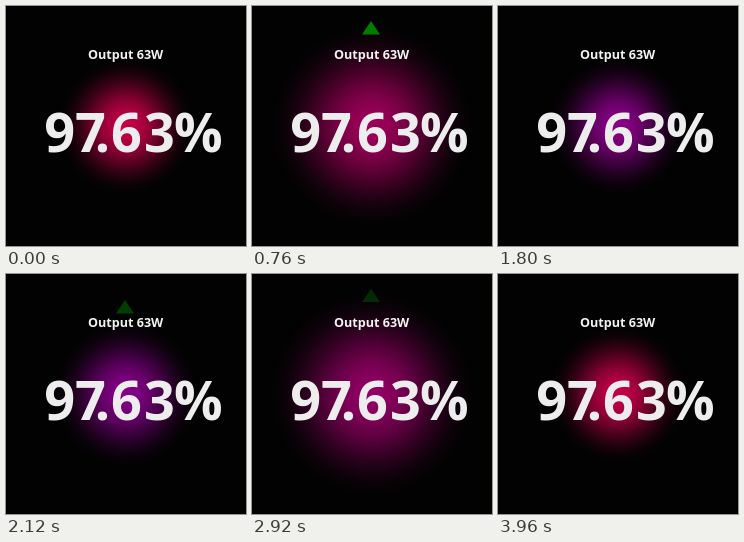
Recreate the animation shown at these times as an HTML page. Size 240 by 240 pixels, loop 4000 ms.

```html
<!DOCTYPE html>
<html lang="en">
<head>
<meta charset="utf-8">
<title>Output</title>
<style>
  html, body { margin: 0; width: 100%; height: 100%; overflow: hidden; background: #020202; }
  svg { display: block; width: 100%; height: 100%; }
  text { font-family: "Open Sans", "Noto Sans", sans-serif; font-weight: 700; }
  .value { font-weight: 650; }
</style>
</head>
<body>
<svg viewBox="0 0 240 240">
  <defs>
    <radialGradient id="fade"></radialGradient>
  </defs>
  <circle id="glow" cx="120" cy="120" fill="url(#fade)"/>
  <path id="arrow" d="M0 0L9 13.6H-9Z" fill="#0f0"/>
  <text x="119.6" y="53" font-size="12.6" text-anchor="middle" fill="#f2f2f2">Output 63W</text>
  <text class="value" x="38.3 69 88.7 105 138 168" y="146" font-size="54" fill="#ededed">97.63%</text>
</svg>
<script>
const LOOP = 4000, PULSE = 2000, STEP = 40;
const PINK = [196, 0, 70], PURPLE = [130, 0, 142];
const get = id => document.getElementById(id);
const glow = get('glow'), arrow = get('arrow'), fade = get('fade');
const mix = (a, b, k) => a + (b - a) * k;

// Soft falloff from the centre to the rim
const STOPS = 12;
const stops = Array.from({ length: STOPS + 1 }, (_, i) => {
  const r = i / STOPS;
  const stop = document.createElementNS('http://www.w3.org/2000/svg', 'stop');
  stop.setAttribute('offset', r);
  stop.setAttribute('stop-opacity', Math.cos(r * Math.PI / 2) ** 2);
  return fade.appendChild(stop);
});

// cubic-bezier(.25, .1, .25, 1)
function ease(x) {
  const curve = (a, b, s) => 3 * a * s * (1 - s) ** 2 + 3 * b * s * s * (1 - s) + s ** 3;
  let lo = 0, hi = 1;
  for (let i = 0; i < 24; i++) {
    const mid = (lo + hi) / 2;
    if (curve(.25, .25, mid) < x) lo = mid; else hi = mid;
  }
  return curve(.1, 1, lo);
}

// Out and back, easing each half
const swing = p => p < .5 ? ease(p * 2) : 1 - ease(p * 2 - 1);

function draw(t) {
  const size = swing(t % PULSE / PULSE);
  const tint = 1 - Math.abs(t / LOOP * 2 - 1);
  const color = `rgb(${PINK.map((c, i) => Math.round(mix(c, PURPLE[i], tint)))})`;
  stops.forEach(s => s.setAttribute('stop-color', color));
  glow.setAttribute('r', mix(70, 105, size));
  glow.setAttribute('opacity', mix(1, .9, size));

  const rise = Math.min(t % PULSE / (PULSE / 2), 1);
  arrow.setAttribute('transform', `translate(119 ${mix(27.7, 14.4, ease(rise))})`);
  arrow.setAttribute('opacity', 1 - Math.abs(rise * 2 - 1));
}

const start = performance.now();
function tick() {
  const t = (performance.now() - start) % LOOP;
  draw(Math.floor(t / STEP) * STEP);
  requestAnimationFrame(tick);
}
tick();
</script>
</body>
</html>
```
